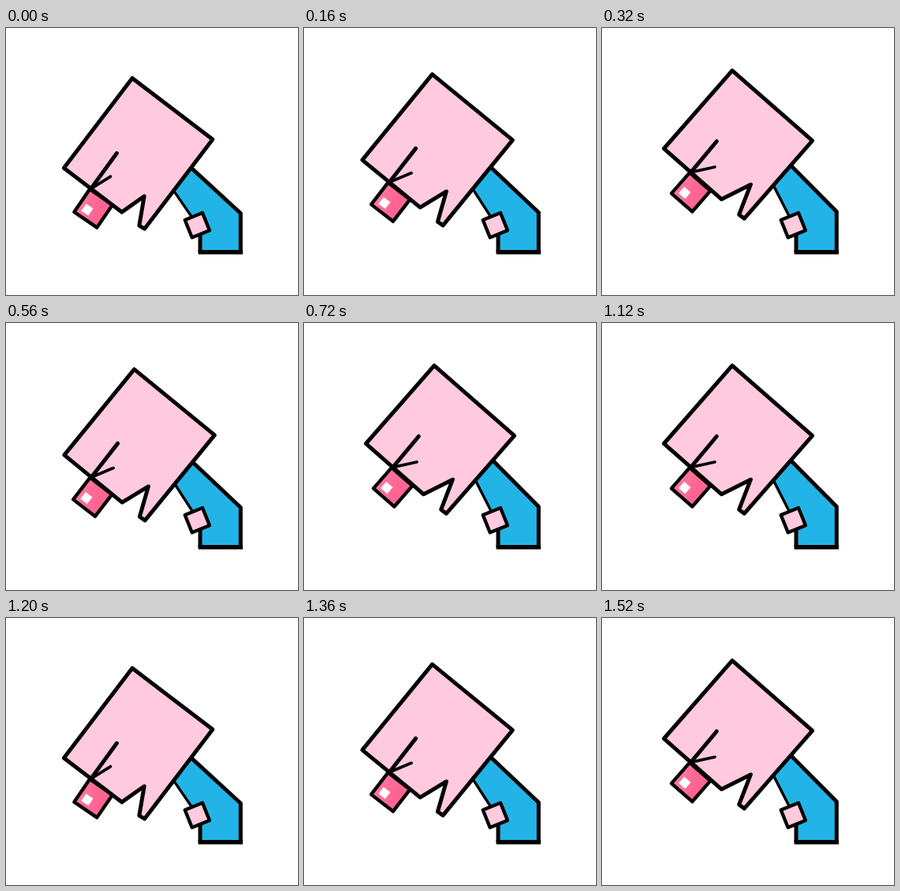
These frames come from a looping animation (370x338 px, 1600 ms). An HTML page:

```html
<!DOCTYPE html>
<html lang="en">
<head>
<meta charset="utf-8">
<title>Tapping hand</title>
<style>
  html, body { margin: 0; width: 100%; height: 100%; overflow: hidden; background: #fff; }
  svg { display: block; width: 100vw; height: 100vh; }
  path { fill: none; stroke: #000; stroke-width: 5; stroke-linejoin: round; stroke-linecap: round; }
  #sleeve { fill: #22b4e6; stroke: none; }
  #hand, #button { fill: #ffc9de; }
  #finger { fill: url(#nail); stroke-width: 4.4; }
  #button { stroke-width: 4.4; }
  #shine { fill: #fff; stroke: none; }
  #sleeveFront { stroke-width: 3.4; }
  #fold { stroke-width: 3.8; }
  #hem { stroke-width: 5.6; stroke-linecap: butt; }
</style>
</head>
<body>
<svg viewBox="0 0 370 338">
  <defs>
    <linearGradient id="nail" x1="0" y1="0.3" x2="1" y2="0.7">
      <stop offset="0.1" stop-color="#ff7a9f"/>
      <stop offset="0.6" stop-color="#ff6593"/>
    </linearGradient>
  </defs>
  <path id="sleeve"/>
  <path id="sleeveBack"/>
  <path id="sleeveFront"/>
  <path id="seam" d="M246 262V283"/>
  <path id="hem" d="M243.6 283.8H300"/>
  <path id="button"/>
  <path id="finger"/>
  <path id="shine"/>
  <path id="hand"/>
  <path id="crease"/>
  <path id="fold"/>
</svg>
<script>
const STEP = 80;
const BEATS = 5;

const mix = (a, b, k) => a + (b - a) * k;

function setPath(id, points, closed = true) {
  document.getElementById(id).setAttribute("d", "M" + points.join(" ") + (closed ? "Z" : ""));
}

// Returns a function that maps local coordinates into a turned, scaled box.
function frame([x, y], degrees, width, height = width) {
  const c = Math.cos(degrees * Math.PI / 180);
  const s = Math.sin(degrees * Math.PI / 180);
  return (u, v) => [x + u * width * c - v * height * s, y + u * width * s + v * height * c];
}

const square = at => [at(0, 0), at(1, 0), at(1, 1), at(0, 1)];

// lift runs from 0 (hand down) to 1 (hand raised).
function draw(lift) {
  const tilt = mix(37.3, 41.2, lift);
  const top = [mix(160, 165, lift), mix(63.5, 53.8, lift)];
  const palm = frame(top, tilt, mix(128, 135, lift), mix(143, 131.5, lift * lift));

  const notch = palm(mix(0.802, 0.835, lift), mix(0.768, 0.709, lift));
  setPath("hand", [palm(0, 0), palm(1, 0), palm(1, 0.995), palm(0.938, 1), notch, palm(0.72, 1), palm(0, 1)]);

  const knuckle = palm(0.337, 1);
  setPath("crease", [palm(0.328, 0.612), knuckle], false);
  setPath("fold", [knuckle, palm(mix(0.418, 0.473, lift), 0.81)], false);

  const finger = frame(palm(0.33, 1.01), mix(tilt - 3, tilt, lift), 35);
  setPath("finger", square(finger));
  setPath("shine", square((u, v) => finger(0.19 + u * 0.31, 0.51 + v * 0.31)));

  const shoulder = palm(1, 0.315);
  const wrist = palm(1, 0.57);
  const elbow = [297.3, mix(234.5, 232.5, lift)];
  const cuff = [236, mix(240, 236, lift)];
  const hem = [297.3, 283];
  setPath("sleeve", [shoulder, elbow, hem, [246, 283], [246, 258], cuff, wrist]);
  setPath("sleeveBack", [shoulder, elbow, hem], false);
  setPath("sleeveFront", [wrist, cuff], false);
}

setPath("button", square(frame([226.7, 243], -22, 24)));

const start = performance.now();
function tick() {
  const beat = Math.floor((performance.now() - start) / STEP) % BEATS;
  // Rest for two beats, then rise by quarters from half way.
  draw(beat < 2 ? 0 : beat / 4);
  requestAnimationFrame(tick);
}
tick();
</script>
</body>
</html>
```
